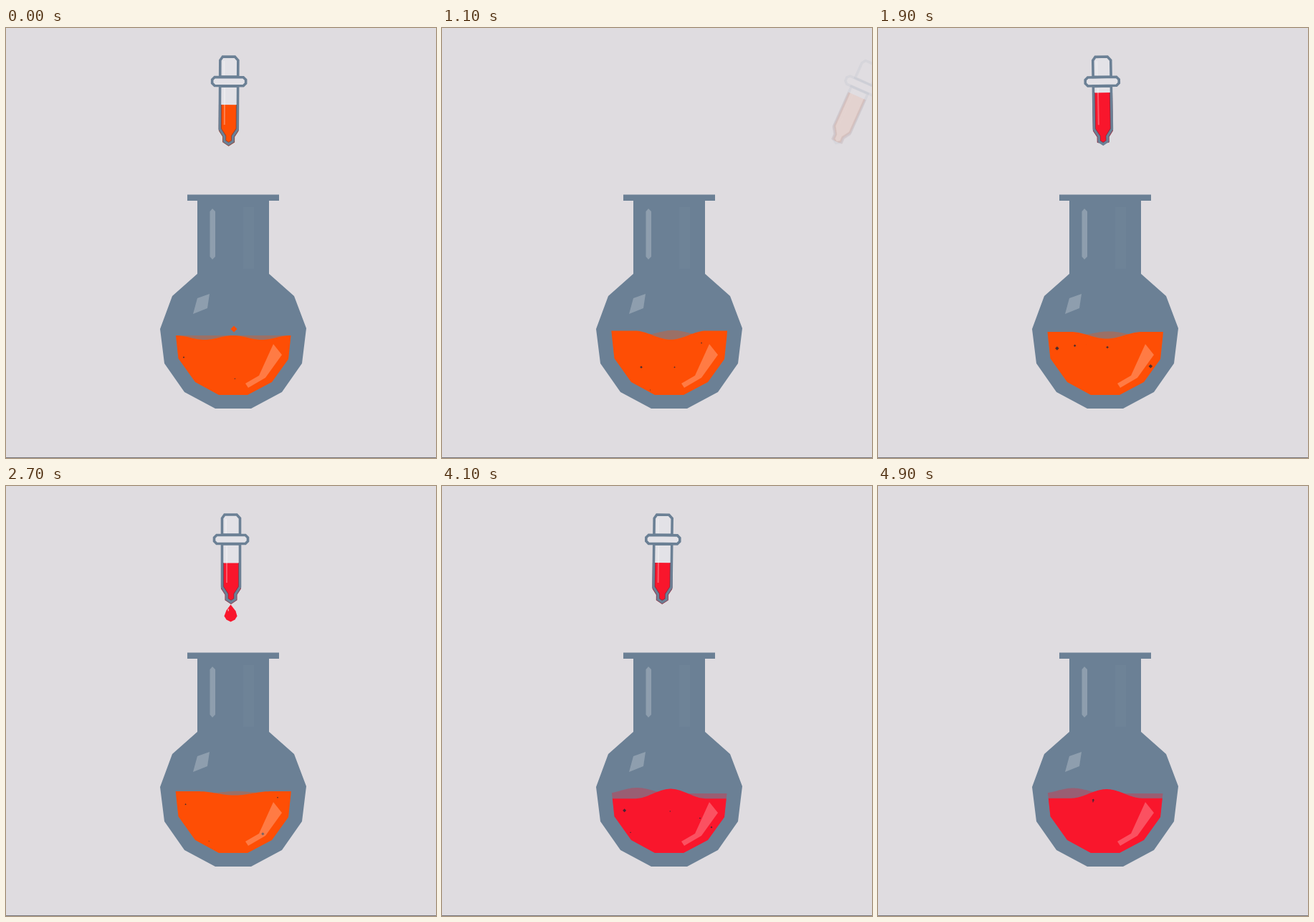
An HTML page with a canvas for the animation above (5 s loop, 600 px wide and 600 px high).

```html
<!DOCTYPE html>
<html lang="en">
<head>
<meta charset="utf-8">
<title>Flask and dropper</title>
<style>
html, body { margin: 0; width: 100%; height: 100%; overflow: hidden; background: #dfdce0; }
canvas { display: block; width: 600px; height: 600px; }
</style>
</head>
<body>
<canvas id="stage" width="600" height="600"></canvas>
<script>
const ctx = document.getElementById('stage').getContext('2d');
const LOOP = 5000, CYCLE = 4000, STEP = 100;
const SLATE = '#6b8095', GLASS = '#e3e2e7', INK = '#232636';
const ORANGE = [254, 78, 5], RED = [249, 22, 44];
const LIQUIDS = [ORANGE, RED, RED];
const SURFACE = 429, LEFT = 234, RIGHT = 400;

const poly = d => new Path2D(`M${d}Z`);
const flask = poly('253 232.5H381V241H367V343L402 374L419 419L413 468L385 508L342 531H292L249 508L221 468L215 420L232 374L267 343V241H253');
const bowl = poly('235 410L237 429L240.5 461L264 494L297 512H337L371 494L394 462L397.5 429L399 410');
const neckShine = poly('288 252L292 256V319L288 323L284.5 319V256');
const neckShade = poly('331 250H346V336H331');
const bodyShine = poly('267 377L284 371L281 391L261 399');
const bowlShine = poly('373 441L385 456L362 488L338 502L334 496L353 485');

// Dropper parts, relative to the middle of the tube
const bulb = poly('-9 -60H8L12.5 -55V-32H-12.5V-55');
const collar = poly('-20 -31.5H20L23.5 -28V-23L20 -19.5H-20L-23.5 -23V-28');
const tube = poly('-12.5 -19H12.5V41L6 51V58L0 62L-6 58V51L-12.5 41');
const drop = poly('0 -12L7 -3L9 4L6 9L0 12L-6 9L-9 4L-6 -4');

const clamp = v => Math.max(0, Math.min(1, v));
const ramp = (t, from, to) => clamp((t - from) / (to - from));
const mix = (a, b, k) => a.map((v, i) => v + (b[i] - v) * k);
const rgb = c => `rgb(${c.map(Math.round).join()})`;
const bump = (x, mid, half) => (1 + Math.cos(Math.PI * clamp(Math.abs(x - mid) / half))) / 2;

let seed = 11;
function random(min, max) {
  seed = (seed * 16807) % 2147483647;
  return min + (max - min) * seed / 2147483647;
}

const bubbles = Array.from({ length: 28 }, (_, i) => ({
  mid: i * LOOP / 28,
  x: random(248, 386),
  y: random(435, 490),
  r: 1 + 2.2 * random(0, 1) ** 2
}));

function paint(path, color, alpha = 1) {
  ctx.save();
  ctx.globalAlpha *= alpha;
  ctx.fillStyle = color;
  ctx.fill(path);
  ctx.restore();
}

function diamond(x, y, r, color, alpha) {
  paint(poly(`${x} ${y - r}L${x + r} ${y}L${x} ${y + r}L${x - r} ${y}`), color, alpha);
}

function wave(height) {
  const path = new Path2D();
  path.moveTo(LEFT, 520);
  for (let x = LEFT; x <= RIGHT; x += 2) path.lineTo(x, SURFACE + height(x));
  path.lineTo(RIGHT, 520);
  path.closePath();
  return path;
}

function drawBubbles(t) {
  for (const { mid, x, y, r } of bubbles) {
    const dt = t - mid;
    const size = r * clamp((500 - Math.abs(dt)) / 250);
    const top = y - 0.08 * dt;
    if (size > 0 && top > SURFACE) diamond(x, top, size, INK, 0.8);
  }
}

// The surface rocks every 400 ms and calms down until the next drop
function drawLiquid(t, p, color) {
  const amp = 8 * Math.max(0, 1 - (p / 3500) ** 2);
  const swing = Math.cos(2 * Math.PI * (p - 100) / 400);
  const ripple = 6 * (1 - ramp(p, 0, 100));
  const front = x => amp * swing * (0.9 - 1.7 * bump(x, 319, 50))
    + ripple * Math.sin(2 * Math.PI * (x - 237) / 160) ** 2;
  const back = x => -amp * Math.abs(swing) * bump(x, 297 - 25 * swing, 45);
  ctx.save();
  ctx.clip(bowl);
  paint(wave(back), rgb(color), 0.32);
  paint(wave(front), rgb(color));
  drawBubbles(t);
  ctx.restore();
  paint(bowlShine, '#fff', 0.25);
}

// Place, tilt, opacity and liquid level of the dropper
function dropperPose(p) {
  const leave = time => 3 * 2 ** (time / 100);
  if (p < 850) {
    const gone = leave(p);
    return { x: -gone, tilt: gone * 0.12, alpha: 1 - ramp(p, 300, 700), level: 7 };
  }
  const left = Math.max(0, (1900 - p) / 800);
  const sway = Math.sin(Math.PI * ramp(p, 1700, 2100));
  return {
    x: 261 * left * left * (2 - left) - leave(p - CYCLE) - 0.8 * sway,
    tilt: 24 * left * left - sway,
    alpha: ramp(p, 1070, 1450),
    level: -10 + 17.5 * ramp(p, 2100, 2600)
  };
}

function drawDropper(p, color) {
  const { x, tilt, alpha, level } = dropperPose(p);
  if (alpha === 0) return;
  const parts = [bulb, tube, collar];
  ctx.save();
  ctx.globalAlpha = alpha;
  ctx.translate(314 + x, 100 + Math.abs(tilt) / 6);
  ctx.rotate(tilt * Math.PI / 180);
  for (const part of parts) paint(part, GLASS);

  ctx.save();
  ctx.beginPath();
  ctx.rect(-14, level, 28, 70);
  ctx.clip();
  paint(tube, rgb(color));
  ctx.lineWidth = 5;
  ctx.strokeStyle = rgb(mix(color, [70, 40, 60], 0.6));
  ctx.stroke(tube);
  ctx.restore();

  ctx.lineWidth = 3.6;
  ctx.strokeStyle = SLATE;
  for (const part of parts) ctx.stroke(part);
  ctx.fillStyle = 'rgba(255,255,255,.3)';
  ctx.fillRect(-7, -16, 2, 51);
  ctx.fillRect(-8, -54, 2, 20);
  ctx.restore();
}

function drawDrop(p, color) {
  const size = ramp(p, 2200, 2650);
  if (size === 0) return;
  const fall = Math.max(0, p - 2700) / 800;
  ctx.save();
  ctx.translate(313.5, 165 + 12.5 * size + 97 * fall * fall);
  ctx.scale(size, size);
  paint(drop, rgb(color));
  ctx.fillStyle = 'rgba(255,255,255,.6)';
  ctx.fillRect(-4, -6, 1.5, 3);
  ctx.restore();
}

function draw(t) {
  const n = Math.floor(t / CYCLE), p = t % CYCLE;
  const now = LIQUIDS[n], next = LIQUIDS[n + 1];
  const color = mix(now, next, ramp(p, 3880, 4020));
  ctx.fillStyle = '#dfdce0';
  ctx.fillRect(0, 0, 600, 600);
  paint(flask, SLATE);
  paint(neckShade, '#fff', 0.02);
  paint(neckShine, '#fff', 0.24);
  paint(bodyShine, '#fff', 0.24);
  drawDrop(p, next);
  drawLiquid(t, p, color);
  diamond(318, 420, 4.5 * (1 - ramp(p, 0, 90)), rgb(color));
  drawDropper(p, mix(now, next, ramp(p, 1100, 1600)));
  ctx.fillStyle = '#77757a';
  ctx.fillRect(0, 599, 600, 1);
}

function tick(ms) {
  draw(Math.floor(ms % LOOP / STEP) * STEP);
  requestAnimationFrame(tick);
}
draw(0);
requestAnimationFrame(tick);
</script>
</body>
</html>
```
